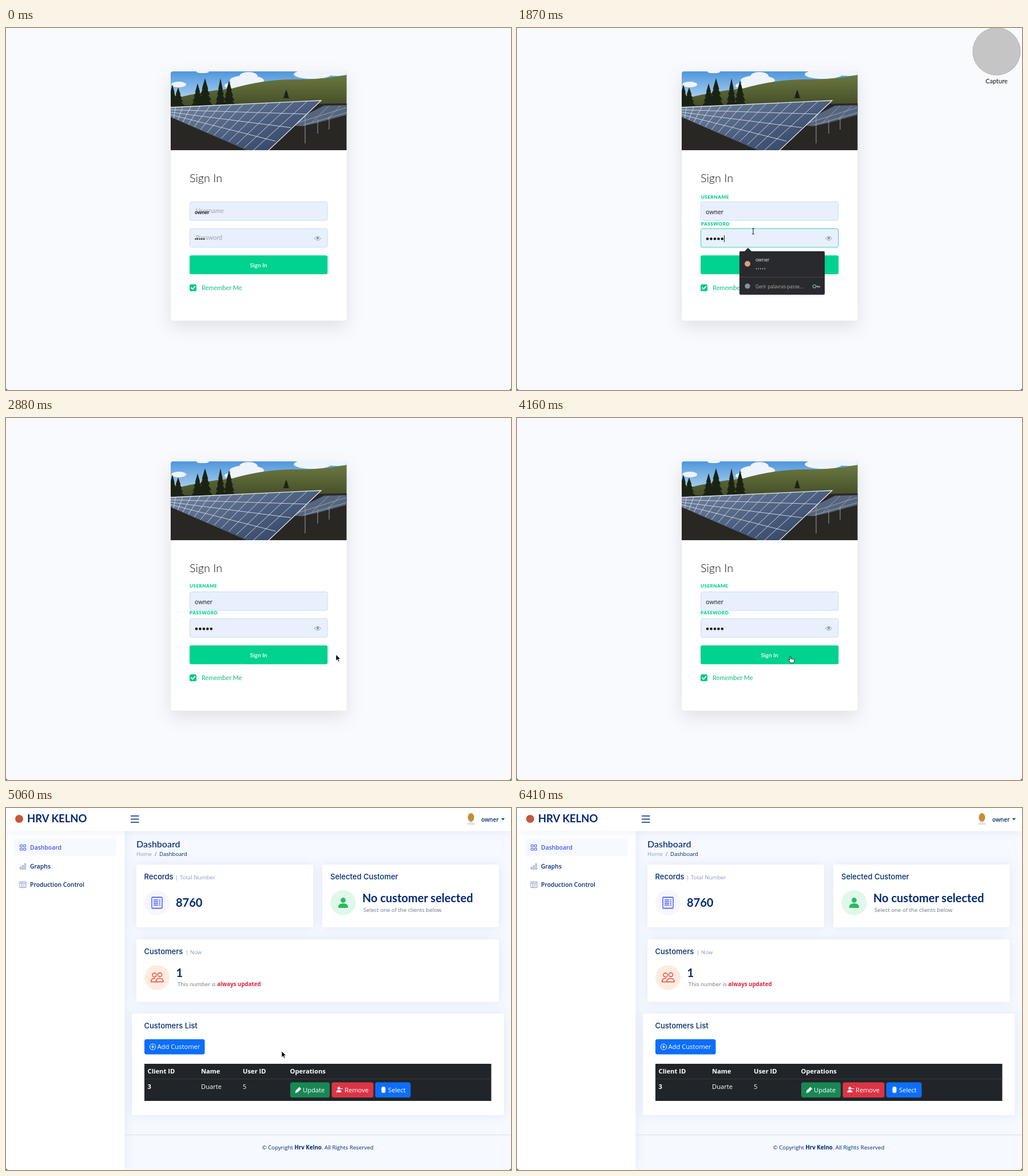
Write an HTML page that moves like this. It is 883 px wide and 634 px high and loops after 6.46 s.

```html
<!DOCTYPE html>
<html lang="en">
<head>
<meta charset="utf-8">
<title>Sign in and dashboard</title>
<style>
  html, body { margin: 0; width: 100%; height: 100%; overflow: hidden; background: #f8fafe; }
  svg { display: block; width: 883px; height: 634px; }
  text { font: 9.7px "Open Sans", sans-serif; fill: #012970; white-space: pre; }
  .lato { font: 11px Lato, sans-serif; fill: #222; }
  .title { font: 300 19.8px Lato, sans-serif; fill: #111; }
  .label { font-family: Lato, sans-serif; fill: #9aa1ac; }
  .label.up { font-weight: 900; letter-spacing: .5px; text-transform: uppercase; fill: #00d28f; }
  .preview { font: bold 8.6px "Liberation Sans", Arial, sans-serif; fill: #222; }
  .field { fill: #e8f0fe; stroke: #cfdaee; }
  .card { fill: #fff; filter: drop-shadow(0 0 9px rgba(1, 41, 112, .09)); }
  .login { fill: #fff; filter: drop-shadow(0 11px 15px rgba(0, 0, 0, .1)); }
  .head { font: bold 20px Lato, sans-serif; }
  .nav { font-weight: 600; font-size: 10.4px; }
  .sub { font: 500 13px Inter, sans-serif; }
  .soft { fill: #899bbd; }
  .grey { fill: #6c757d; }
  .table, .btn { font-size: 11.2px; fill: #fff; }
  .bold { font-weight: bold; }
  .line { fill: none; stroke-linecap: round; stroke-linejoin: round; }
</style>
</head>
<body>
<svg viewBox="0 0 883 634">
  <defs>
    <linearGradient id="sky" x2="0" y2="1"><stop stop-color="#4f97dc"/><stop offset="1" stop-color="#c4def3"/></linearGradient>
    <linearGradient id="hill" x2="0" y2="1"><stop stop-color="#6c7840"/><stop offset="1" stop-color="#3d4725"/></linearGradient>
    <linearGradient id="panel" x2="1" y2="1"><stop stop-color="#74859f"/><stop offset=".5" stop-color="#4c5f80"/><stop offset="1" stop-color="#2a3a58"/></linearGradient>
    <clipPath id="photoClip"><path d="M288 214V80q0-4 4-4h299.500q4 0 4 4v134z"/></clipPath>
  </defs>

  <rect width="883" height="634" fill="#f8fafe"/>

  <g id="login">
    <rect class="login" x="288" y="76" width="307.500" height="436.500" rx="4"/>
    <g clip-path="url(#photoClip)">
      <rect x="288" y="76" width="308" height="60" fill="url(#sky)"/>
      <g fill="#eef4fb">
        <ellipse cx="421" cy="92" rx="30" ry="9"/><ellipse cx="424" cy="85" rx="16" ry="8"/>
        <ellipse cx="402" cy="101" rx="20" ry="6"/><ellipse cx="536" cy="81" rx="33" ry="8"/>
        <ellipse cx="580" cy="78" rx="26" ry="6"/><ellipse cx="302" cy="99" rx="13" ry="5"/>
        <ellipse cx="344" cy="77" rx="11" ry="2"/>
      </g>
      <path d="M300 122Q350 110 395 106Q450 90 505 90Q550 91 596 82V145H300z" fill="url(#hill)"/>
      <path d="M288 136L596 132V214H288z" fill="#292723"/>
      <g id="trees" fill="#1a2313"/>
      <path d="M488 170L556 136L596 135V152L545 166L518 172z" fill="#56657e"/>
      <path d="M500 169L596 139M520 170L596 148M535 165L565 136M562 160L585 136M523 150V202M545 160V185M565 155V178" fill="none" stroke="#98a1aa"/>
      <path d="M288 139L551 127L450 222H439L288 156z" fill="url(#panel)"/>
      <path id="panelLines" fill="none" stroke="#cbd3dd"/>
      <path d="M288 139L551 127L455 218" fill="none" stroke="#e6eaef" stroke-width="1.300"/>
    </g>

    <text class="title" x="321" y="269.500">Sign In</text>
    <rect class="field" x="321.500" y="304.500" width="240.500" height="32.500" rx="3"/>
    <rect class="field" id="password" x="321.500" y="351.500" width="240.500" height="32.500" rx="3"/>
    <text class="label">Username</text>
    <text class="label">Password</text>
    <g id="preview">
      <text class="preview" x="330" y="325.500">owner</text>
      <path d="M331.500 369.500h15" class="line" stroke="#222" stroke-width="2.500" stroke-dasharray="0 3.600"/>
    </g>
    <g id="filled">
      <text class="lato" x="330" y="325.500">owner</text>
      <path d="M333 369.300h26.500" class="line" stroke="#111" stroke-width="4.600" stroke-dasharray="0 6.450"/>
    </g>
    <g class="line" stroke="#8d96a3" stroke-width=".9">
      <path d="M539.500 368.500q5.500-7 11 0q-5.500 7-11 0z"/><circle cx="545" cy="368" r="1.700" fill="#858e9b"/>
    </g>
    <rect x="321" y="398.300" width="241.300" height="33" rx="3" fill="#00d28f"/>
    <text class="lato" x="441.700" y="419" text-anchor="middle" style="font-size:10.2px;font-weight:600;fill:#fff">Sign In</text>
    <rect x="321" y="449" width="12" height="12" rx="2.500" fill="#00c98a"/>
    <path d="M324 455l2.300 2.300 4.200-4.600" class="line" stroke="#fff" stroke-width="1.800"/>
    <text class="lato" x="342" y="459" style="fill:#13b986">Remember Me</text>

    <g id="popup">
      <path d="M362.500 363v12" stroke="#222"/>
      <path d="M391 391h7l6-6 6 6h126q2 0 2 2v72q0 2-2 2h-145q-2 0-2-2v-72q0-2 2-2z" fill="#292a2d" style="filter:drop-shadow(0 1px 1px #0003)"/>
      <path d="M389 436.500h149" stroke="#434549"/>
      <circle cx="403" cy="413" r="5" fill="#d3a187"/>
      <text x="417" y="409" style="font-size:8.3px;fill:#e8eaed">owner</text>
      <path d="M418.500 421.500h15" class="line" stroke="#b5b7ba" stroke-width="2" stroke-dasharray="0 3.700"/>
      <circle cx="403" cy="452" r="4.600" fill="#8d9196"/>
      <text x="417" y="455.500" style="font-size:8.1px;fill:#b2b09d">Gerir palavras-passe...</text>
      <path d="M523 452.500h6v2M526 452.500v2" class="line" stroke="#a5aaa8" stroke-width="1.300"/>
      <circle cx="520" cy="452.500" r="2.700" fill="none" stroke="#58b89a" stroke-width="1.300"/>
    </g>
  </g>

  <g id="capture">
    <circle cx="838.500" cy="41" r="41.500" fill="#c5c5c5" stroke="#b2b2b2"/>
    <text x="838.500" y="96.500" text-anchor="middle" style="font:500 11px Lato,sans-serif;fill:#222">Capture</text>
  </g>

  <g id="dashboard">
    <rect width="883" height="634" fill="#f6f9ff"/>
    <rect class="card" y="40" width="207.500" height="594"/>
    <rect class="card" width="883" height="40.500"/>
    <circle cx="23" cy="19" r="7" fill="#c4573f"/>
    <text class="head" x="37" y="25" style="font-size:18.500px">HRV KELNO</text>
    <path d="M218.500 14h13.500M218.500 19.500h13.500M218.500 25h13.500" class="line" stroke="#012970" stroke-width="1.400"/>
    <path d="M806 29.500q0-5 7-5t7 5z" fill="#dfe3e9"/><ellipse cx="813" cy="16.500" rx="5.500" ry="7.500" fill="#c18f35"/>
    <text class="nav" x="831" y="23.500" style="font-size:10px">owner</text>
    <path d="M866 18h6l-3 3.300z" fill="#012970"/>

    <rect x="14" y="54" width="179.500" height="29.500" rx="3" fill="#f6f9ff"/>
    <path d="M25 64.500h3.500v3.500h-3.500zM31 64.500h3.500v3.500h-3.500zM25 70.500h3.500v3.500h-3.500zM31 70.500h3.500v3.500h-3.500z" class="line" stroke="#4154f1"/>
    <path d="M24.500 107v-3.500h2v3.500zM28.500 107v-6.500h2v6.500zM32.500 107v-9.500h2v9.500zM24.500 129h10.500v10.500h-10.500zM24.500 131.500h10.500M27.500 132v7.500M29.500 134h3.500M29.500 137h3.500" class="line" stroke="#899bbd"/>
    <text class="nav" x="42" y="72.500" style="fill:#4154f1">Dashboard</text>
    <text class="nav" x="42" y="105.500">Graphs</text>
    <text class="nav" x="42" y="138">Production Control</text>

    <text x="228" y="69" style="font:500 16px Lato,sans-serif">Dashboard</text>
    <text x="228" y="84" class="soft" style="font-size:9.500px">Home</text>
    <text x="260" y="84" class="grey">/</text>
    <text x="268" y="84" style="font-size:9.500px">Dashboard</text>

    <rect class="card" x="228" y="99" width="309" height="110" rx="3"/>
    <rect class="card" x="553" y="99" width="309" height="110" rx="3"/>
    <rect class="card" x="228" y="230" width="634" height="109.500" rx="3"/>
    <rect class="card" x="220" y="360" width="650.500" height="178" rx="3"/>

    <text class="sub" x="241.500" y="125">Records</text>
    <text class="soft" x="296" y="125">| Total Number</text>
    <circle cx="264" cy="166" r="22" fill="#f6f6fe"/>
    <path d="M255 157l1.500-1.200 1.500 1.200 1.500-1.200 1.500 1.200 1.500-1.200 1.500 1.200 1.500-1.200 1.500 1.200 1.500-1.200 1.500 1.200 1.500-1.200 1.500 1.200v18l-1.500 1.200-1.500-1.200-1.500 1.200-1.500-1.200-1.500 1.200-1.500-1.200-1.500 1.200-1.500-1.200-1.500 1.200-1.500-1.200-1.500 1.200-1.500-1.200zM258.500 161h7M258.500 164h7M258.500 167h7M258.500 170h7M268 161h1.500M268 164h1.500M268 167h1.500M268 170h1.500" class="line" stroke="#4154f1" stroke-width="1.400"/>
    <text class="head" x="297" y="172.500">8760</text>

    <text class="sub" x="567" y="125">Selected Customer</text>
    <circle cx="589.500" cy="166" r="22" fill="#e0f8e9"/>
    <path d="M581 173.500q0-6.500 8.500-6.500t8.500 6.500q0 1.500-1.500 1.500h-14q-1.500 0-1.500-1.500z" fill="#29ba63"/><circle cx="589.500" cy="161.500" r="4.400" fill="#29ba63"/>
    <text class="head" x="623" y="164.500">No customer selected</text>
    <text class="grey" x="625" y="181.500">Select one of the clients below</text>

    <text class="sub" x="241.500" y="255.500">Customers</text>
    <text class="soft" x="314" y="255.500">| Now</text>
    <circle cx="264" cy="297" r="22" fill="#ffecdf"/>
    <g class="line" stroke="#e5483a" stroke-width="1.400">
      <circle cx="259.500" cy="292.500" r="3.500"/><circle cx="269" cy="292" r="3.500"/>
      <path d="M261 304.500h-7.500q0-6 6.500-6M262 304.500q0-6 6.500-6t6.500 6z"/>
    </g>
    <text class="head" x="297.500" y="295.500">1</text>
    <text class="grey" x="300" y="311.500">This number is <tspan class="bold" fill="#d7263b">always updated</tspan></text>

    <text class="sub" x="241.500" y="386">Customers List</text>
    <rect x="242" y="405" width="105.500" height="26.500" rx="3.500" fill="#0d6efd"/>
    <circle cx="256.500" cy="418.300" r="5.200" fill="none" stroke="#fff"/><path d="M253.500 418.300h6M256.500 415.300v6" stroke="#fff"/>
    <text class="btn" x="264.500" y="422.300">Add Customer</text>

    <rect x="242" y="448" width="606.500" height="65" fill="#212529"/>
    <path d="M242 474.500h606.500" stroke="#373b3e"/>
    <text class="table bold" x="247.500" y="465">Client ID</text>
    <text class="table bold" x="341" y="465">Name</text>
    <text class="table bold" x="414" y="465">User ID</text>
    <text class="table bold" x="496.500" y="465">Operations</text>
    <text class="table bold" x="247.500" y="492">3</text>
    <text class="table" x="341" y="492">Duarte</text>
    <text class="table" x="414" y="492">5</text>
    <rect x="497" y="480.500" width="69" height="26.500" rx="3.500" fill="#198754"/>
    <rect id="remove" x="569.500" y="480.500" width="73" height="26.500" rx="3.500"/>
    <rect x="645.500" y="480.500" width="62" height="26.500" rx="3.500" fill="#0d6efd"/>
    <g fill="#fff">
      <path d="M505.500 499l1-4 6.500-6.500 3.200 3.200-6.500 6.500z"/>
      <circle cx="582" cy="490.700" r="2.500"/><path d="M577.500 498q0-4 4.500-4t4.500 4zM585 491h4v1.200h-4z"/>
      <rect x="656.500" y="488" width="7" height="11" rx="3.200"/>
    </g>
    <text class="btn" x="519" y="497.500">Update</text>
    <text class="btn" x="592" y="497.500">Remove</text>
    <text class="btn" x="668" y="497.500">Select</text>

    <path d="M207.500 572.500H883" stroke="#d5e1f1"/>
    <text x="545" y="598" text-anchor="middle">© Copyright <tspan class="bold">Hrv Kelno</tspan>. All Rights Reserved</text>
  </g>

  <path d="M0 630v4h4q-4 0-4-4zM883 630v4h-4q4 0 4-4z" fill="#222"/>

  <g id="cursor">
    <path id="arrow" d="M0 0v10.500l2.500-2.200 1.700 3.900 1.700-.8-1.700-3.800h3.400z" fill="#000" stroke="#fff" stroke-width=".6"/>
    <path id="beam" d="M-2-5h1.500l.5.500.5-.5h1.500M0-4.500v9M-2 5h1.500l.5-.5.5.5h1.500" fill="none" stroke="#111"/>
    <path id="hand" d="M-1 1q1-1.500 2 0v4q1-1 2 .200 1-1 2 .200 1.300-.800 2 .400v3l-1.500 3.200h-5l-3.500-4.500q-.300-1.500 1.200-1l.8.800z" fill="#fff" stroke="#111" stroke-width=".9"/>
  </g>
</svg>
<script>
const LOOP = 6460;
const FOCUS = 1530, BLUR = 2620, BLANK = 4350, DASHBOARD = 4610;
const el = id => document.getElementById(id);
const labels = document.querySelectorAll('.label');

// Cursor waypoints: time, x, y
const path = [
  [150, 838, 640], [710, 533, 442], [810, 533, 442], [1260, 436, 382], [1400, 413, 356],
  [2190, 413, 356], [2620, 630, 392], [2820, 583, 414], [2880, 577, 414.500], [3430, 511, 417],
  [3530, 511, 417], [3660, 480, 418], [3850, 480, 418], [4000, 472, 409], [4160, 478, 417],
  [4860, 478, 417], [5060, 482, 426], [5470, 613, 512],
  [5570, 613, 512], [5660, 617, 503], [6110, 832, 640]
];

const clamp = u => Math.max(0, Math.min(1, u));
const smooth = u => (u = clamp(u), u * u * (3 - 2 * u));
const mix = (a, b, u) => a + (b - a) * u;
const show = (id, on) => el(id).style.display = on ? '' : 'none';

function cursorAt(t) {
  const next = path.findIndex(p => p[0] > t);
  if (next < 0) return path[path.length - 1].slice(1);
  if (next === 0) return path[0].slice(1);
  const [t0, x0, y0] = path[next - 1], [t1, x1, y1] = path[next];
  const u = smooth((t - t0) / (t1 - t0));
  return [mix(x0, x1, u), mix(y0, y1, u)];
}

function drawPhoto() {
  const point = (u, v) => [mix(mix(288, 551, u), mix(288, 445, u), v), mix(mix(139, 127, u), mix(156, 222, u), v)];
  const segment = (a, b) => `M${a}L${b}`;
  let lines = '';
  for (const v of [.25, .5, .75]) lines += segment(point(0, v), point(1, v));
  for (let i = 1; i < 14; i++) lines += segment(point((i / 14) ** 1.3, 0), point((i / 14) ** 1.3, 1));
  el('panelLines').setAttribute('d', lines);

  // Trees: x, top, half width
  const trees = [[291, 99, 10], [301, 104, 11], [335, 97, 11], [348, 88, 14], [375, 88, 10], [390, 92, 12], [490, 108, 6]];
  for (const [x, top, half] of trees) {
    const base = x > 400 ? 123 : 136;
    let d = '';
    for (let i = 0; i < 4; i++) {
      const y = mix(top, base, i / 5), w = half * (i + 2) / 5;
      d += `M${x} ${y}L${x + w} ${y + (base - top) * .4}H${x - w}z`;
    }
    el('trees').innerHTML += `<path d="${d}"/>`;
  }
}

function render(t) {
  const onLogin = t < BLANK, onDashboard = t >= DASHBOARD;
  const focused = t >= FOCUS && t < BLUR, floated = t >= FOCUS;
  show('login', onLogin);
  show('dashboard', onDashboard);
  show('preview', !floated);
  show('filled', floated);
  show('popup', focused);
  el('password').style.stroke = focused ? '#3fd3a6' : '';
  el('capture').style.opacity = smooth((t - 1620) / 150) * (1 - smooth((t - 2190) / 250));

  const rise = smooth((t - FOCUS) / 400);
  labels.forEach((label, i) => {
    label.classList.toggle('up', floated);
    label.setAttribute('x', mix(332, 321, rise));
    label.setAttribute('y', mix(324, 297, rise) + 47 * i);
    label.style.fontSize = mix(11, 8, rise) + 'px';
  });

  const [x, y] = cursorAt(t);
  const within = (left, top, right, bottom) => x >= left && x <= right && y >= top && y <= bottom;
  const overRemove = onDashboard && within(569, 480, 642, 507);
  const overHand = overRemove || onLogin && within(321, 398, 562, 431);
  const overField = onLogin && within(321, 351, 562, 380);
  el('remove').style.fill = overRemove ? '#bb2d3b' : '#dc3545';
  el('cursor').setAttribute('transform', `translate(${x} ${y})`);
  show('hand', overHand);
  show('beam', overField);
  show('arrow', !overHand && !overField);
}

drawPhoto();
const start = performance.now();
function tick() {
  render((performance.now() - start) % LOOP);
  requestAnimationFrame(tick);
}
tick();
</script>
</body>
</html>
```
